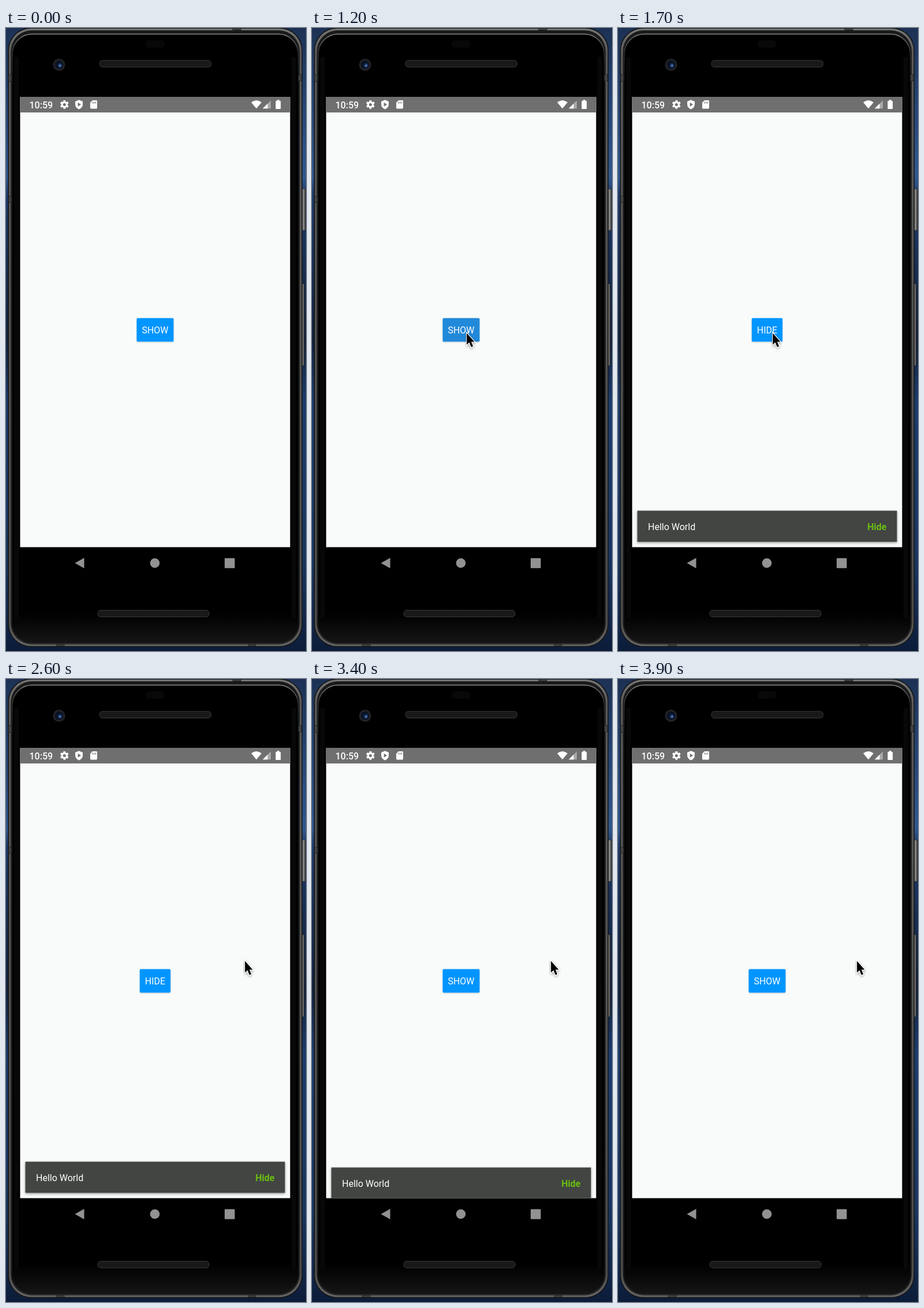
An HTML page that plays this animation: 520 px wide and 1077 px high, repeating every 4 s.

```html
<!DOCTYPE html>
<html lang="en">
<head>
<meta charset="utf-8">
<title>Snackbar demo</title>
<style>
  html, body { margin: 0; width: 100%; height: 100%; overflow: hidden; background: #14294c; }
  svg { display: block; width: 520px; height: 1077px; }
  text { font: 400 16px Roboto, sans-serif; fill: #fff; }
</style>
</head>
<body>
<svg viewBox="0 0 520 1077">
  <defs>
    <linearGradient id="sea" x2="0" y2="1">
      <stop offset="0" stop-color="#1c3154"/>
      <stop offset=".12" stop-color="#244474"/>
      <stop offset=".24" stop-color="#30588f"/>
      <stop offset=".27" stop-color="#1d3a68"/>
      <stop offset=".4" stop-color="#162b4e"/>
      <stop offset=".5" stop-color="#12213c"/>
      <stop offset=".6" stop-color="#1b3c6d"/>
      <stop offset=".85" stop-color="#183660"/>
      <stop offset=".95" stop-color="#11264a"/>
      <stop offset="1" stop-color="#0c1c38"/>
    </linearGradient>
    <linearGradient id="rim" x2="0" y2="1">
      <stop offset="0" stop-color="#777"/>
      <stop offset=".04" stop-color="#585858"/>
      <stop offset=".96" stop-color="#4c4c4c"/>
      <stop offset="1" stop-color="#666"/>
    </linearGradient>
    <linearGradient id="gloss" x2="0" y2="1">
      <stop offset="0" stop-color="#8a8a8a"/>
      <stop offset=".03" stop-color="#333"/>
      <stop offset=".08" stop-color="#0c0c0c"/>
      <stop offset=".97" stop-color="#0c0c0c"/>
      <stop offset="1" stop-color="#333"/>
    </linearGradient>
    <linearGradient id="glass" x2="0" y2="1">
      <stop offset=".95" stop-color="#000"/>
      <stop offset="1" stop-color="#161616"/>
    </linearGradient>
    <linearGradient id="key">
      <stop offset="0" stop-color="#333"/>
      <stop offset=".5" stop-color="#8d8d8d"/>
      <stop offset="1" stop-color="#3b3b3b"/>
    </linearGradient>
    <radialGradient id="lens" cx=".62" cy=".6">
      <stop offset="0" stop-color="#9fc0ee"/>
      <stop offset=".35" stop-color="#24457c"/>
      <stop offset="1" stop-color="#0a1224"/>
    </radialGradient>
    <pattern id="mesh" width="3" height="3" patternUnits="userSpaceOnUse">
      <rect width="3" height="3" fill="#1c1c1c"/>
      <circle cx="1.5" cy="1.5" r=".9" fill="#0e0e0e"/>
    </pattern>
    <filter id="soft" x="-20%" y="-40%" width="140%" height="200%">
      <feDropShadow dx="0" dy="1.5" stdDeviation="2" flood-opacity=".4"/>
    </filter>
    <filter id="faint" x="-20%" y="-20%" width="140%" height="150%">
      <feDropShadow dx="0" dy="1" stdDeviation="1" flood-opacity=".2"/>
    </filter>
    <clipPath id="screen"><rect x="24.5" y="119" width="468" height="778.5"/></clipPath>
  </defs>

  <rect width="520" height="1077" fill="url(#sea)"/>

  <!-- Phone body -->
  <g fill="url(#key)" stroke="#222" stroke-width=".8">
    <rect x="511" y="278" width="8.5" height="72" rx="2"/>
    <rect x="511" y="442" width="6" height="142" rx="2"/>
  </g>
  <rect x="3.5" y="-.5" width="510.5" height="1070.5" rx="39" fill="#151515"/>
  <rect x="5" y="1" width="507.5" height="1067.5" rx="38" fill="url(#rim)"/>
  <rect x="8.5" y="4" width="500.5" height="1061.5" rx="36" fill="#1a1a1a"/>
  <rect x="11" y="10.5" width="495.5" height="1054" rx="34" fill="url(#glass)" stroke="url(#gloss)" stroke-width="1.3"/>
  <path d="M18 50V1020M499 50V1020" stroke="#080808" stroke-width="8"/>
  <g fill="#444" stroke="#222">
    <path d="M4.5 80.5h5v12h-5zM4.5 291h5v10h-5zM507 80.5h5.5v11h-5.5z"/>
    <path d="M393 .5h14v3h-14zM87 1065.5h14v3h-14zM420 1065.5h13v3h-13z"/>
  </g>
  <rect x="242" y="21" width="33" height="13" rx="6" fill="#080808"/>
  <g fill="url(#mesh)" stroke="#383838">
    <rect x="162" y="56" width="193.5" height="11.5" rx="5"/>
    <rect x="159" y="1006.5" width="193" height="11.5" rx="5"/>
  </g>
  <circle cx="92" cy="63.5" r="10.5" fill="#232327"/>
  <circle cx="92" cy="63.5" r="7.5" fill="#0b1223"/>
  <circle cx="92.5" cy="64" r="5" fill="url(#lens)"/>

  <!-- System navigation -->
  <g fill="#929292">
    <path d="M119.5 925 135.5 916v18z"/>
    <circle cx="258" cy="925" r="8.3"/>
    <rect x="379" y="916.5" width="17.5" height="17.3" rx="1"/>
  </g>

  <g clip-path="url(#screen)">
    <rect x="24" y="119" width="470" height="780" fill="#f8fbfa"/>
    <rect x="24" y="119" width="470" height="27" fill="#6f6f6f"/>
    <text x="40.5" y="138.5" style="font-weight:500">10:59</text>
    <g fill="#fff">
      <g id="gear" transform="translate(101.3 132.4)"><circle r="5.6"/></g>
      <circle cx="101.3" cy="132.4" r="2.5" fill="#6f6f6f"/>
      <path d="M126.5 124.3 133 127v4.8q0 6-6.5 8.7-6.5-2.7-6.5-8.7V127z"/>
      <path d="M124.6 128.8v7l5.4-3.5z" fill="#6f6f6f"/>
      <path d="M150 125h6.6q1.4 0 1.4 1.4v11.7q0 1.4-1.4 1.4h-9.2q-1.4 0-1.4-1.4V129z"/>
      <path d="M150.3 127.5v3M152.9 127.5v3M155.4 127.5v3" stroke="#6f6f6f" stroke-width="1.2"/>
      <path d="M425 128.5q9-7 18 0L434 139.3z"/>
      <path d="M459 125.2v14h-14z" opacity=".4"/>
      <path d="M453.5 130.7v8.5H445z"/>
      <path d="M469.8 124.3h4v1.6h1.4q1 0 1 1v12q0 1-1 1h-6.8q-1 0-1-1v-12q0-1 1-1h1.4z"/>
    </g>

    <rect id="button" y="501.6" height="40.6" rx="2" filter="url(#faint)"/>
    <text id="label" x="258.5" y="528" text-anchor="middle"></text>

    <g id="snackbar">
      <rect x="33.5" y="834.5" width="450" height="53.8" fill="#434443" filter="url(#soft)"/>
      <text x="52" y="868">Hello World</text>
      <text x="465.5" y="868" text-anchor="end" style="font-weight:700;fill:#69bd10">Hide</text>
    </g>

    <g id="cursor" filter="url(#soft)">
      <path d="M.2 .5V20.6L4.6 16.6 7.8 24.6 11.2 23.2 8 15.5H13.6z" stroke="#fff" stroke-width="2.2" paint-order="stroke"/>
    </g>
  </g>
</svg>
<script>
const LOOP = 4000, STEP = 100;
const [gear, button, label, snackbar, cursor] =
  ['gear', 'button', 'label', 'snackbar', 'cursor'].map(id => document.getElementById(id));

for (let i = 0; i < 6; i++) {
  gear.insertAdjacentHTML('beforeend',
    `<rect x="-1.9" y="-7.4" width="3.8" height="4" rx=".6" transform="rotate(${i * 60})"/>`);
}

// Rows are [ms, ...values]
const cursorPath = [[100, 284, 760], [200, 280, 665], [300, 277, 607], [400, 276.5, 551],
  [500, 276, 547], [600, 271, 535], [700, 268, 527], [1800, 268, 527], [1900, 280, 524],
  [2000, 318, 515], [2100, 385, 496], [2300, 408, 489], [2400, 414, 487]];
const slide = [[1400, 63], [1500, 32], [1600, 5], [1700, 0], [3300, 0], [3400, 10], [3500, 47], [3600, 66]];
const press = [[1000, 0], [1100, .6], [1200, 1], [1300, .7], [1400, 0]];

function sample(rows, t) {
  const next = rows.findIndex(row => row[0] > t);
  if (next === 0) return rows[0].slice(1);
  if (next < 0) return rows[rows.length - 1].slice(1);
  const a = rows[next - 1], b = rows[next];
  const k = (t - a[0]) / (b[0] - a[0]);
  return a.slice(1).map((v, i) => v + (b[i + 1] - v) * k);
}

const mix = (from, to, k) => `rgb(${from.map((v, i) => Math.round(v + (to[i] - v) * k))})`;

function draw(t) {
  const [x, y] = sample(cursorPath, t);
  cursor.setAttribute('transform', `translate(${x} ${y})`);
  cursor.setAttribute('visibility', t < 100 ? 'hidden' : 'visible');

  const open = t >= 1400 && t < 3400;
  const width = open ? 53.4 : 64;
  label.textContent = open ? 'HIDE' : 'SHOW';
  button.setAttribute('x', 258.5 - width / 2);
  button.setAttribute('width', width);
  button.setAttribute('fill', mix([0, 149, 255], [32, 137, 218], sample(press, t)[0]));

  const [offset] = sample(slide, t);
  snackbar.setAttribute('transform', `translate(0 ${offset})`);
  snackbar.setAttribute('visibility', offset < 63 ? 'visible' : 'hidden');
}

const start = performance.now();
function tick() {
  const t = (performance.now() - start) % LOOP;
  draw(Math.floor(t / STEP) * STEP);
  requestAnimationFrame(tick);
}
tick();
</script>
</body>
</html>
```
